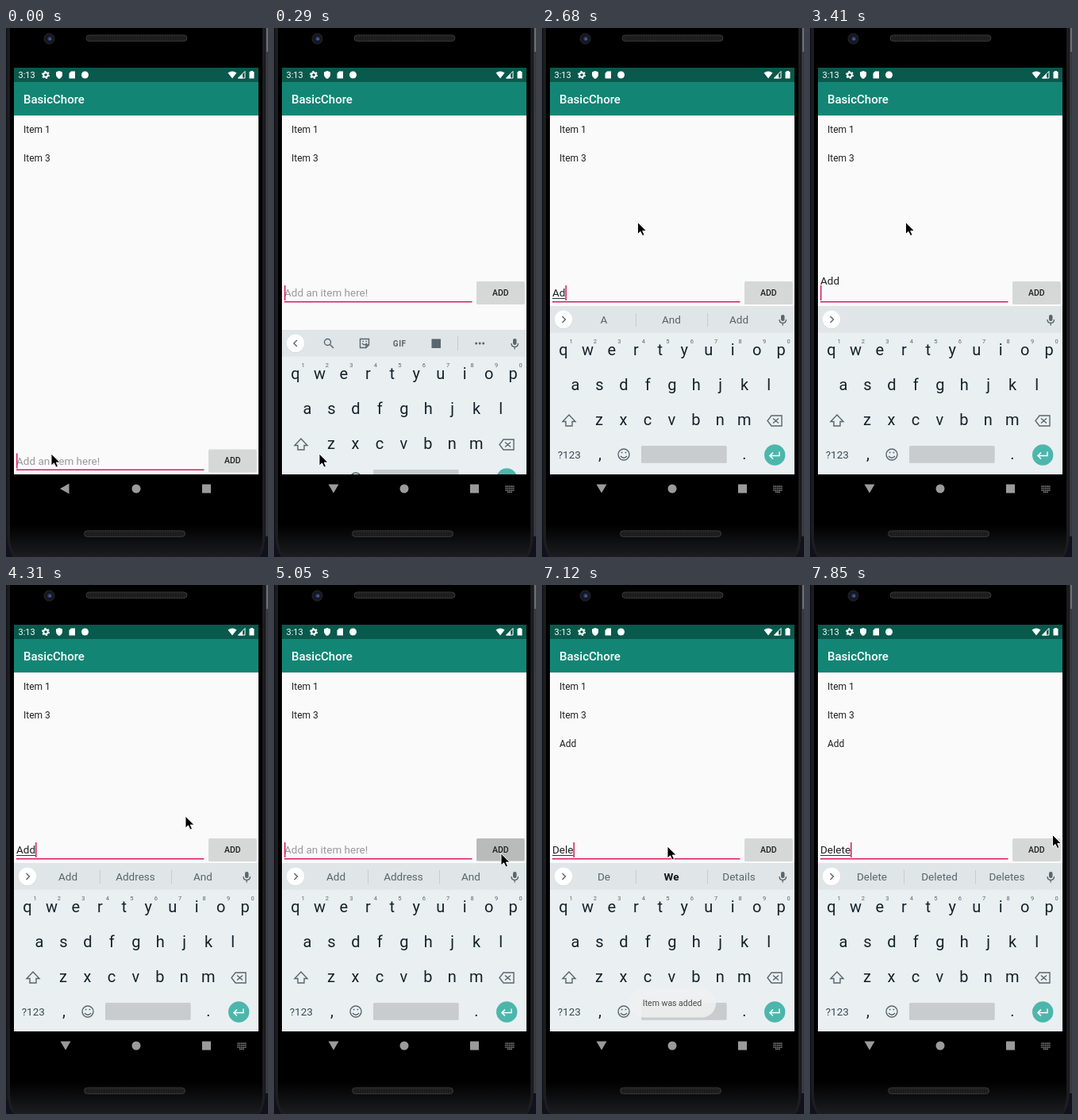
Write an HTML page that moves like this. It is 330 px wide and 666 px high and loops after 8 s.

```html
<!DOCTYPE html>
<html lang="en">
<head>
<meta charset="utf-8">
<title>To-do app</title>
<style>
  html, body { margin: 0; width: 100%; height: 100%; overflow: hidden; background: #000; }
  svg { display: block; width: 330px; height: 666px; font-family: Roboto, sans-serif; }
  text { white-space: pre; }
  .mid { text-anchor: middle; }
  .line { fill: none; stroke: #59666d; stroke-width: 1.4; }
  .list { font-size: 12px; fill: #212121; }
  .field { font-size: 13.5px; }
  .key { font-size: 20px; fill: #14232b; }
  .hint { font-size: 7.5px; fill: #59666d; }
  .word { font-size: 13.5px; fill: #59666d; }
</style>
</head>
<body>
<svg viewBox="0 0 330 666">
  <defs>
    <clipPath id="screen"><path d="M10 50H318V562H10Z"/></clipPath>
    <pattern id="mesh" width="3" height="3" patternUnits="userSpaceOnUse">
      <path d="M0 0H3V3H0Z" fill="#222"/><path d="M0 0H1.5V1.5H0Z" fill="#111"/>
    </pattern>
    <linearGradient id="chin" x2="0" y2="1">
      <stop stop-color="#000"/><stop offset="1" stop-color="#1c1d20"/>
    </linearGradient>
  </defs>

  <!-- phone body -->
  <path d="M0 0H330V666H0Z" fill="#10111c"/>
  <path d="M327 0H330V640H327Z" fill="#38393d"/>
  <path d="M328 0H330V30H328Z" fill="#6c6d71"/>
  <path d="M1.500 0H326.500V640Q326.500 655 320 666H9Q1.500 655 1.500 640Z" fill="#1c1d20"/>
  <path d="M5 0H323V640H5Z"/>
  <path d="M5 625H323V640Q323 655 317 666H12Q5 655 5 640Z" fill="url(#chin)"/>
  <circle cx="54.500" cy="13.500" r="6.500" fill="#17181d" stroke="#26272c"/>
  <circle cx="55" cy="13.500" r="2.500" fill="#2c4180"/>
  <circle cx="55.500" cy="14" r="1" fill="#5a6fb0"/>
  <g fill="url(#mesh)" stroke="#3a3a3a">
    <rect x="101" y="9" width="127" height="7.500" rx="3.700"/>
    <rect x="98.500" y="633" width="127" height="7.500" rx="3.700"/>
  </g>

  <!-- navigation bar -->
  <g fill="#9b9b9b">
    <path id="back"/>
    <circle cx="164" cy="580" r="5.500"/>
    <path d="M247 574.500H258V585.500H247Z"/>
    <path id="imeKey" d="M291.500 577H303M291.500 579.500H303M291.500 582H303M294 584.200H300.500"
      fill="none" stroke="#9b9b9b" stroke-width="1.400" stroke-dasharray="1.400 .8"/>
  </g>

  <g clip-path="url(#screen)">
    <path d="M10 50H318V562H10Z" fill="#fafafa"/>
    <path d="M10 110H318V111H10Z" opacity=".12"/>
    <path d="M10 68H318V110H10Z" fill="#138575"/>
    <path d="M10 50H318V68H10Z" fill="#09594c"/>
    <g fill="#fff">
      <text x="15.500" y="63" font-size="11">3:13</text>
      <circle cx="50" cy="59" r="2.800" fill="none" stroke="#fff" stroke-width="2"/>
      <circle cx="50" cy="59" r="4.300" fill="none" stroke="#fff" stroke-width="1.500" stroke-dasharray="2.200 2.300"/>
      <path d="M67 54L71 55.500V59Q70.500 62.500 67 64Q63.500 62.500 63 59V55.500Z"/>
      <path d="M82 54.500H87V63.500H79.500V57Z"/>
      <circle cx="99.500" cy="59" r="4.500"/>
      <path d="M279.500 56.500Q285 52.500 290.500 56.500L285 63.500Z"/>
      <path d="M292.500 63L301 54.500V63Z" fill="none" stroke="#fff"/>
      <path d="M292 63.500L298 57.500V63.500Z"/>
      <path d="M308 54H311V55H312.500V63.500H306.500V55H308Z"/>
      <text x="22" y="95" font-size="15" font-weight="500">BasicChore</text>
    </g>
    <g class="list">
      <text x="22" y="132.300">Item 1</text>
      <text x="22" y="168.300">Item 3</text>
      <text x="22" y="204.300" id="added">Add</text>
    </g>

    <!-- entry row -->
    <g id="entry">
      <text id="value" class="field" x="13" fill="#212121"></text>
      <text id="prompt" class="field" x="13" y="338" fill="#999">Add an item here!</text>
      <path id="compose" stroke="#333" stroke-width="1"/>
      <path d="M13 344.700H249.500" stroke="#d81b60" stroke-width="1.500"/>
      <rect id="caret" y="324" width="1.500" height="19" fill="#d81b60"/>
      <rect x="255" y="320" width="60.500" height="28" rx="1.500" fill="#000" opacity=".15"/>
      <rect id="button" x="255" y="319" width="60.500" height="28" rx="1.500"/>
      <text class="mid" x="285.300" y="336.600" font-size="10.500" font-weight="500" fill="#212121">ADD</text>
    </g>

    <!-- keyboard -->
    <g id="keyboard">
      <path d="M10 350H318V562H10Z" fill="#eaeff2"/>
      <path d="M10 350H318V383.500H10Z" fill="#e0e5e8"/>
      <circle cx="27" cy="367.500" r="11.300" fill="#c9ced1"/>
      <circle cx="27" cy="367" r="11.200" fill="#fff"/>
      <path id="chevron" class="line"/>
      <rect x="301" y="361" width="4.500" height="8" rx="2.200" fill="#59666d"/>
      <path class="line" d="M299 367Q299 371.500 303.200 371.500T307.500 367M303.200 371.500V374.500"/>
      <g id="tools">
        <circle class="line" cx="67.500" cy="365.500" r="4"/>
        <path class="line" d="M70.500 368.500L75 373"/>
        <path class="line" d="M108.500 361.500H119.500V369L116 372.500H108.500ZM116 372V369H119.500M111 367Q114 370.500 117 367M111.500 364.500H113M115.500 364.500H117"/>
        <text class="mid" x="158.200" y="370.500" font-size="10" font-weight="700" letter-spacing=".5" fill="#59666d">GIF</text>
        <rect x="198.500" y="361.500" width="11.500" height="11.500" fill="#59666d"/>
        <path d="M231.500 358V376" stroke="#c6ccd0"/>
        <g fill="#59666d">
          <circle cx="254.700" cy="367" r="1.500"/><circle cx="259.200" cy="367" r="1.500"/><circle cx="263.700" cy="367" r="1.500"/>
        </g>
      </g>
      <g id="words">
        <path d="M118.500 359V376M208.500 359V376" stroke="#c6ccd0"/>
        <text class="word mid" x="78" y="372"></text>
        <text class="word mid" x="163" y="372"></text>
        <text class="word mid" x="248" y="372"></text>
      </g>
      <g id="keys"></g>
      <path class="line" d="M34 487L42 495.500H38V501H30V495.500H26Z"/>
      <path class="line" d="M289 488H302V501H289L284 494.500ZM291 491.500L298 497.500M298 491.500L291 497.500"/>
      <text class="mid" x="34.300" y="542" font-size="13.500" fill="#3c4b53">?123</text>
      <circle class="line" cx="103" cy="537" r="7"/>
      <path class="line" d="M99 539Q103 543.500 107 539M99.700 534.500H101.500M104.500 534.500H106.300"/>
      <rect x="125" y="526" width="107.700" height="21.700" rx="1.500" fill="#c8cccf"/>
      <circle cx="293.200" cy="537.500" r="13.200" fill="#4db6ac"/>
      <path d="M299 533.500V538.500H287.500M291 534.500L287 538.500L291 542.500" fill="none" stroke="#fff" stroke-width="1.600"/>
    </g>
    <g id="toast">
      <rect x="110.500" y="508" width="108.500" height="36.500" rx="18" fill="#f0f1f1"/>
      <text class="mid" x="164" y="529.800" font-size="10.500" fill="#333">Item was added</text>
    </g>
  </g>
  <path id="mouse" d="M0 0V15L3.500 11.800L6 17L8.500 16L6.200 11H11Z" stroke="#fff" stroke-width=".9"/>
</svg>
<script>
const $ = id => document.getElementById(id);
const set = (id, attrs) => { for (const k in attrs) $(id).setAttribute(k, attrs[k]); };
const show = (id, on) => set(id, { opacity: +on });
const LOOP = 8000;

// Tracks are lists of [start in ms, value...]; each value holds until the next.
const mouse = [[0, 57, 536], [880, 93, 372], [1030, 120.5, 239], [1930, 120.5, 244.5],
  [3860, 147, 254], [4160, 187, 266], [4310, 226, 291], [4450, 258, 316],
  [4600, 279, 332], [4750, 286, 338], [5340, 262, 337], [5480, 208, 328],
  [5630, 169, 326], [5780, 161, 327], [5930, 158, 329],
  [7420, 192, 322], [7560, 243, 310], [7710, 288, 304], [7850, 305.5, 314.5]];
const typed = [[0, ''], [2530, 'A'], [2680, 'Ad'], [2830, 'Add'], [2980, 'Add\n'],
  [4160, 'Add'], [5050, ''], [6830, 'D'], [6980, 'De'], [7120, 'Dele'],
  [7270, 'Delet'], [7420, 'Delete']];
const bar = [[0, 'tools'], [2530, ''], [2680, 'A And Add'], [2830, 'Add Address And'],
  [3120, ''], [3560, 'tools'], [4160, 'Add Address And'], [5340, 'tools'], [6830, ''],
  [6980, 'D Do Did'], [7120, 'De *We Details'], [7270, 'Dele Delete Deleted'],
  [7420, 'Delete Deleted Deletes']];
const blink = [0, 440, 1030, 1480, 1930, 3120, 3410, 3860, 4160, 4750, 5050, 5630, 5930, 6530, 6830]
  .map((t, i) => [t, 1 - i % 2]);
const slide = [[0, 212], [140, 130], [290, 30], [440, 0]];
const entryDrop = [[0, 211.5], [290, 0]];
const item = [[0, 0], [5190, .6], [5340, 1]];
const toast = [[0, 0], [5190, .5], [5340, 1], [7120, .85], [7270, 0]];
const press = [[0, '#d6d8d7'], [4900, '#c6c8c7'], [5050, '#b9bbba'], [5340, '#d3d5d4'], [5930, '#d6d8d7']];
const at = (track, t) => track.findLast(k => k[0] <= t).slice(1);

function addKey(x, y, text, cls = 'key') {
  $('keys').insertAdjacentHTML('beforeend', `<text class="${cls} mid" x="${x}" y="${y}">${text}</text>`);
}
[['qwertyuiop', 27, 412], ['asdfghjkl', 42, 456], ['zxcvbnm', 72, 500]].forEach(([row, x, y], r) =>
  [...row].forEach((c, i) => {
    addKey(x + i * 30.45, y, c);
    if (!r) addKey(x + 9.5 + i * 30.45, 397, (i + 1) % 10, 'hint');
  }));
addKey(73, 543, ',');
addKey(255, 543, '.');

function drawBar(mode) {
  const tools = mode === 'tools';
  show('tools', tools);
  show('words', !tools && mode);
  set('chevron', { d: tools ? 'M29 363L25 367L29 371' : 'M25.500 363L29.500 367L25.500 371' });
  if (tools || !mode) return;
  const words = mode.split(' ');
  $('words').querySelectorAll('text').forEach((el, i) => {
    const bold = words[i][0] === '*';
    el.textContent = words[i].replace('*', '');
    el.style.fontWeight = bold ? 700 : 400;
    el.style.fill = bold ? '#111' : '';
  });
}

function drawEntry(text, caretOn) {
  const line = text.trim(), broken = text.endsWith('\n');
  $('value').textContent = line;
  set('value', { y: broken ? 322.5 : 338 });
  show('prompt', !line);
  const end = 13 + (line && !broken ? $('value').getComputedTextLength() : 0);
  set('compose', { d: end > 13 ? `M13 340.500H${end}` : '' });
  set('caret', { x: end, opacity: caretOn });
}

function draw(t) {
  const [x, y] = at(mouse, t), open = t >= 140;
  set('mouse', { transform: `translate(${x} ${y})` });
  set('entry', { transform: `translate(0 ${at(entryDrop, t)})` });
  set('keyboard', { transform: `translate(0 ${at(slide, t)})` });
  set('back', { d: open ? 'M68.500 574.500H81.500L75 585.500Z' : 'M79.500 573.500V586.500L68 580Z' });
  show('imeKey', open);
  set('added', { opacity: at(item, t) });
  set('toast', { opacity: at(toast, t) });
  set('button', { fill: at(press, t) });
  drawBar(at(bar, t)[0]);
  drawEntry(at(typed, t)[0], at(blink, t)[0]);
}

const start = performance.now();
function frame() {
  draw((performance.now() - start) % LOOP);
  requestAnimationFrame(frame);
}
frame();
</script>
</body>
</html>
```
